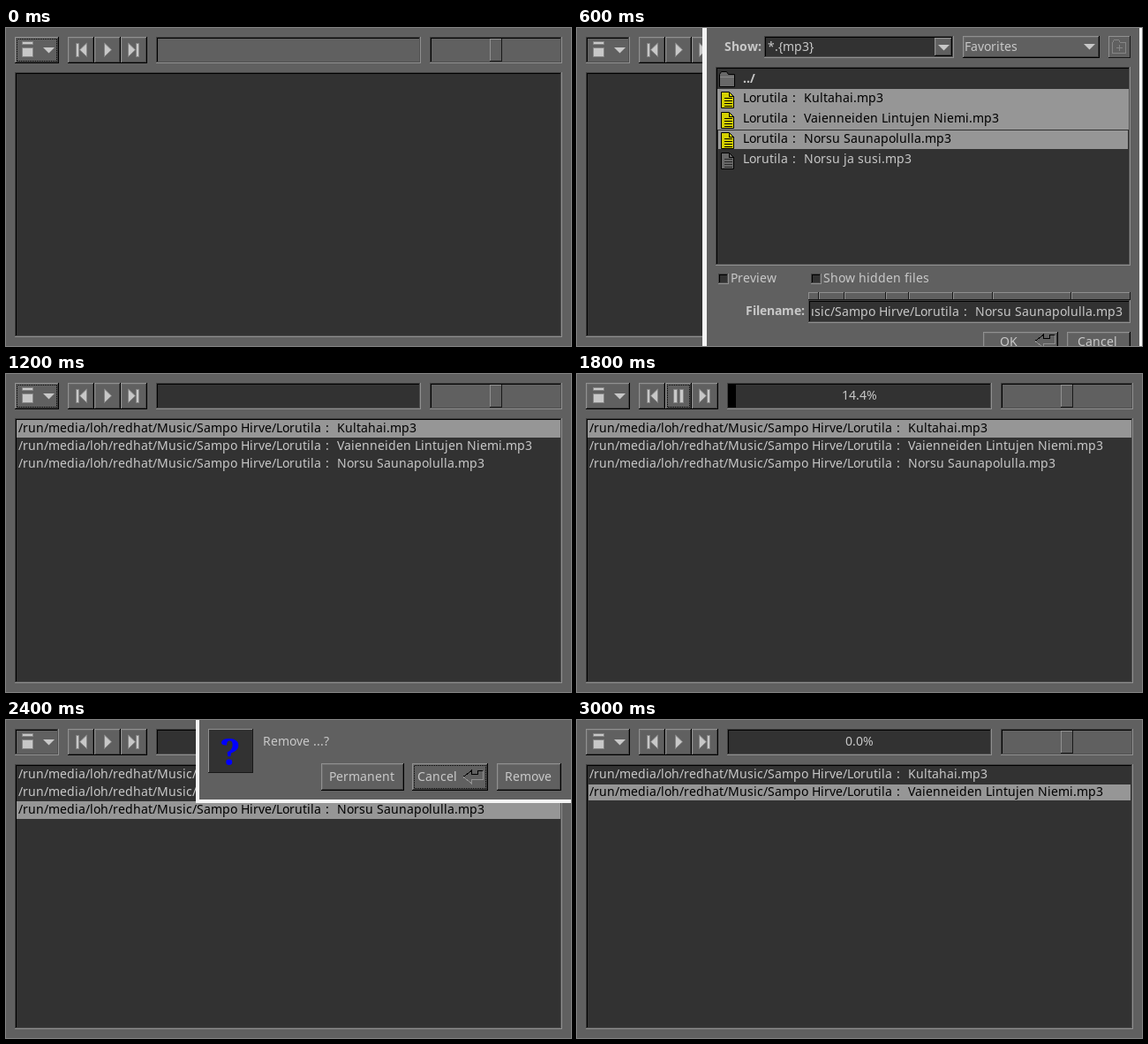
Animation, 640 px wide and 360 px high, one loop 3.6 s. Source, as an HTML page:

```html
<!DOCTYPE html>
<html lang="fi">
<head>
<meta charset="utf-8">
<title>Music player</title>
<style>
html, body { margin: 0; width: 100%; height: 100%; overflow: hidden; background: #606060; }
svg { display: block; }
text { font: 14px "Noto Sans", sans-serif; font-kerning: none; }
text.bold { font-weight: 700; }
text.ask { font: 700 42px "Noto Serif", serif; }
rect, .crisp { shape-rendering: crispEdges; }
.scene { visibility: hidden; animation: turn 3600ms step-end infinite; }
@keyframes turn {
  0% { visibility: visible; }
  16.6667%, 100% { visibility: hidden; }
}
</style>
</head>
<body>
<svg id="stage" width="640" height="360" viewBox="0 0 640 360"></svg>
<script>
const FACE = '#606060', DARK = '#323232', SEL = '#969696', INK = '#c8c8c8';
const LIGHT = '#909090', SOFT = '#6c6c6c', DIM = '#505050', SHADE = '#404040', BLACK = '#000';
const ctx = document.createElement('canvas').getContext('2d');

const rect = (x, y, w, h, fill) =>
  `<rect x="${x}" y="${y}" width="${w}" height="${h}" fill="${fill}"/>`;
const path = (d, fill, extra = '') => `<path d="${d}" fill="${fill}" ${extra}/>`;
const line = (d, color) => path(d, 'none', `class="crisp" stroke="${color}"`);

// Toolkit text: every glyph advances by whole pixels.
function text(x, y, str, fill = INK, bold = false) {
  ctx.font = `${bold ? 'bold ' : ''}14px "Noto Sans", sans-serif`;
  const xs = [];
  for (const ch of str) {
    xs.push(x);
    x += Math.round(ctx.measureText(ch).width);
  }
  return `<text x="${xs.join(' ')}" y="${y}" fill="${fill}"${bold ? ' class="bold"' : ''}>${str}</text>`;
}

// Two-pixel bevels: outer light/dark edge, then inner one.
const edge = (x, y, w, h, tl, br) =>
  rect(x, y, w, 1, tl) + rect(x, y, 1, h, tl) +
  rect(x, y + h - 1, w, 1, br) + rect(x + w - 1, y, 1, h, br);
const up = (x, y, w, h, fill = FACE) =>
  rect(x, y, w, h, fill) + edge(x + 1, y + 1, w - 2, h - 2, SOFT, SHADE) + edge(x, y, w, h, LIGHT, BLACK);
const down = (x, y, w, h, fill = DARK) =>
  rect(x, y, w, h, fill) + edge(x + 1, y + 1, w - 2, h - 2, BLACK, DIM) + edge(x, y, w, h, SHADE, LIGHT);
const thin = (x, y, w, h, fill = FACE) =>
  rect(x, y, w, h, fill) + edge(x, y, w, h, LIGHT, '#181818');
const focus = (x, y, w, h) => edge(x, y, w, h, 'url(#dots)', 'url(#dots)');

// Symbols are filled and outlined in a darker tone.
const symbol = d => path(d, INK, 'stroke="#868686"');
const block = (x, y, w, h) => symbol(`M${x + .5} ${y + .5}h${w - 1}v${h - 1}h${1 - w}z`);
const arrow = (x, y) => path(`M${x} ${y}h13l-6.5 6.5z`, INK);
const enter = (x, y) =>
  line(`M${x} ${y + 7.5}l9 -7v4h7v-4h6`, BLACK) +
  line(`M${x} ${y + 7.5}l9 7v-4h13v-10`, LIGHT);

const album = 'Lorutila\u2004:\u2004 ';
const tracks = ['Kultahai.mp3', 'Vaienneiden Lintujen Niemi.mp3', 'Norsu Saunapolulla.mp3', 'Norsu ja susi.mp3'];
const folder = '/run/media/loh/redhat/Music/Sampo Hirve/';

function player({ rows = 0, sel = -1, label = '', fill = 0, on = '', playing = false, held = false, bar = DARK }) {
  let s = rect(0, 0, 640, 360, FACE);
  s += held ? down(10, 10, 50, 30, FACE) : up(10, 10, 50, 30);
  s += block(18, 15, 13, 4) + block(18, 22, 13, 11) + arrow(42, 22);
  for (const x of [70, 100, 130]) s += up(x, 10, 30, 30);
  s += block(79, 17, 4, 16) + symbol('M91.5 17v15.5l-8 -7.75z');
  s += playing ? block(109, 17, 5, 16) + block(116, 17, 5, 16) : symbol('M111.5 17v15.5l8 -7.75z');
  s += symbol('M138.5 17v15.5l8 -7.75z') + block(147, 17, 4, 16);
  if (on === 'menu') s += focus(12, 12, 46, 26);
  if (on === 'play') s += focus(102, 12, 26, 26);

  s += down(170, 10, 300, 30, bar);
  if (fill) s += rect(171, 12, fill, 26, BLACK);
  if (label) s += text(label.length > 4 ? 300 : 304, 29, label);
  s += down(480, 10, 150, 30, FACE) + thin(548, 12, 14, 26);

  s += down(10, 50, 620, 300);
  for (let i = 0; i < rows; i++) {
    const y = 52 + 20 * i;
    if (i === sel) s += on === 'list' ? rect(13, y + 1, 614, 18, SEL) : rect(12, y, 616, 20, SEL);
    s += text(14, y + 14, folder + album + tracks[i], i === sel ? BLACK : INK);
  }
  return s;
}

function sheet(x, y, paper, ink) {
  let s = path(`M${x} ${y}h9l5 5v13h-14z`, paper, `stroke="${BLACK}"`) + line(`M${x + 9} ${y}v5h5`, BLACK);
  for (let i = 0; i < 4; i++) s += rect(x + 3, y + 6 + 3 * i, 9, 1, ink);
  return s;
}

function chooser() {
  let s = rect(142, 0, 498, 360, '#f4f4f4') + rect(147, 0, 490, 360, FACE);
  s += text(167, 26, 'Show:', INK, true) + down(212, 9, 215, 25) + text(216, 26, '*.{mp3}');
  s += up(405, 11, 20, 21) + arrow(409, 19);
  s += up(437, 9, 155, 25) + text(439, 26, 'Favorites') + arrow(574, 18);
  s += thin(602, 9, 25, 25) + line('M606.5 28.5v-12l2 -3h5l2 3h6v12zM611 22.5h7M614.5 19v7', '#858585');

  s += down(157, 44, 470, 225);
  s += path('M161.5 66.5v-14l2 -3h6l2 3h7v14z', '#686868', `stroke="${BLACK}"`) + line('M162 55.5h16', '#8a8a8a');
  s += text(188, 62, '../', INK, true);
  tracks.forEach((name, i) => {
    const y = 69 + 23 * i, picked = i < 3;
    if (picked) s += rect(159, y, 466, 23, SEL);
    s += sheet(163.5, y + 3.5, picked ? '#d4d000' : '#686868', picked ? BLACK : '#282828');
    s += text(188, y + 15, album + name, picked ? BLACK : INK);
  });
  s += edge(159, 115, 466, 23, DARK, DARK);

  for (const [x, label] of [[160, 'Preview'], [265, 'Show hidden files']])
    s += down(x, 278, 12, 12) + text(x + 14, 288, label);

  const cuts = [262, 274, 303, 350, 376, 426, 471, 560, 627];
  for (let i = 0; i < cuts.length - 1; i++) s += thin(cuts[i], 299, cuts[i + 1] - cuts[i], 9);
  s += text(191, 325, 'Filename:', INK, true) + down(262, 308, 365, 26);
  s += `<svg x="266" y="310" width="358" height="22" viewBox="266 310 358 22">${
    text(247, 326, 'Music/Sampo Hirve/' + album + tracks[2])}</svg>`;

  s += up(460, 344, 85, 31) + text(479, 360, 'OK') + enter(519, 347);
  return s + up(555, 344, 72, 31) + text(567, 360, 'Cancel');
}

function question() {
  let s = rect(215, 0, 425, 94, '#f4f4f4') + rect(219, 0, 421, 90, FACE);
  s += thin(229, 10, 51, 50, DARK) + '<text class="ask" x="254" y="51" text-anchor="middle" fill="#00f">?</text>';
  s += text(291, 29, 'Remove ...?');
  s += up(357, 49, 94, 31) + text(366, 69, 'Permanent');
  s += up(460, 49, 86, 31) + text(466, 69, 'Cancel') + enter(518, 57) + focus(462, 51, 82, 27);
  return s + up(556, 49, 73, 31) + text(565, 69, 'Remove');
}

const scenes = [
  player({ on: 'menu', bar: FACE }),
  player({ held: true, bar: FACE }) + chooser(),
  player({ rows: 3, sel: 0, on: 'menu' }),
  player({ rows: 3, sel: 0, on: 'play', playing: true, label: '14.4%', fill: 9 }),
  player({ rows: 3, sel: 2, held: true }) + question(),
  player({ rows: 2, sel: 1, on: 'list', label: '0.0%' })
];
const dots = `<pattern id="dots" width="2" height="2" patternUnits="userSpaceOnUse">${
  rect(0, 0, 1, 1, BLACK) + rect(1, 1, 1, 1, BLACK)}</pattern>`;
document.getElementById('stage').innerHTML = dots + scenes.map((s, i) =>
  `<g class="scene" style="animation-delay:${600 * i - 3600}ms">${s}</g>`).join('');
</script>
</body>
</html>
```
